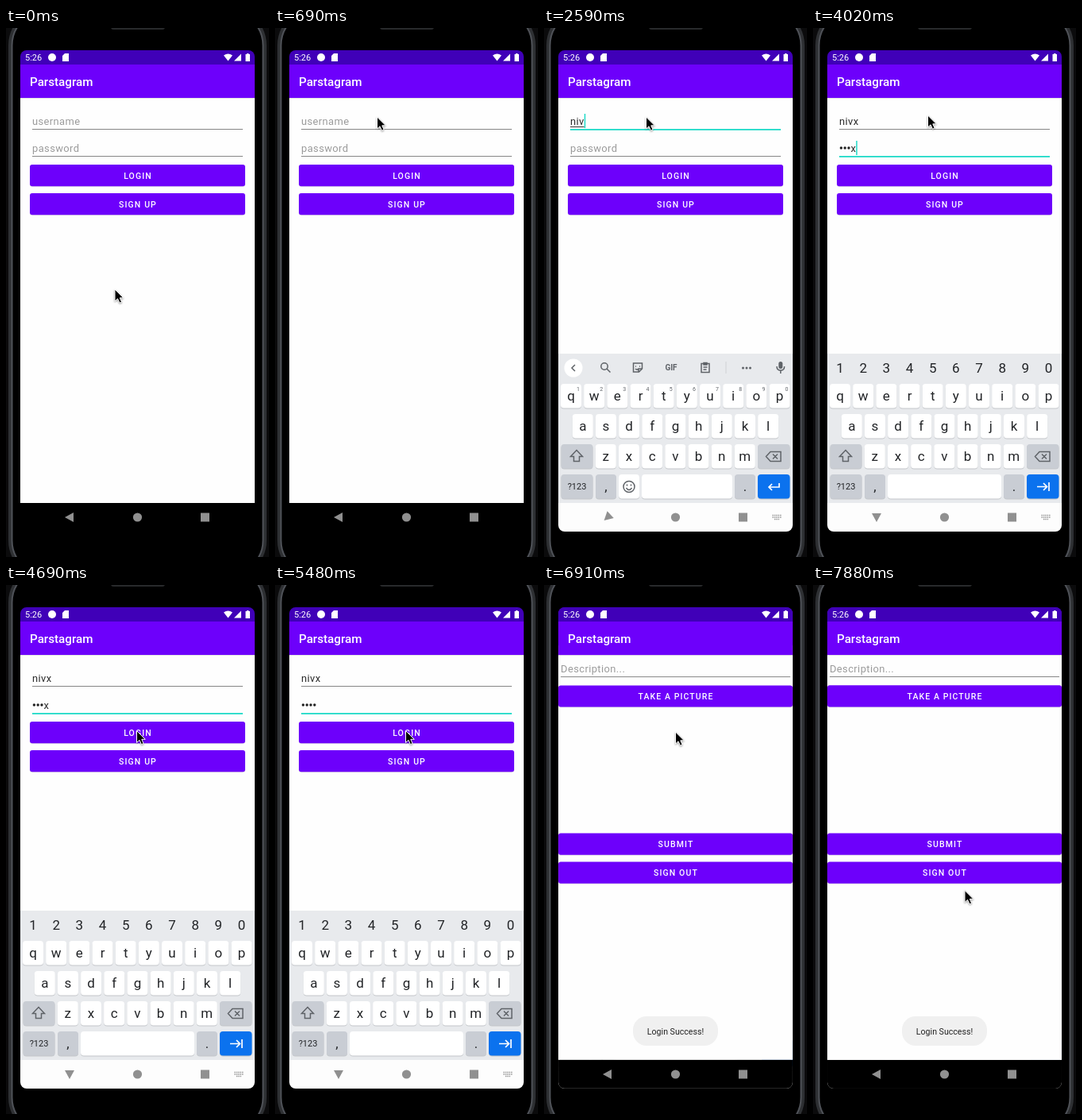
These frames come from a looping animation (331 px wide and 666 px high, 8 s). An HTML page:

```html
<!DOCTYPE html>
<html lang="en">
<head>
<meta charset="utf-8">
<style>
  html, body { margin: 0; width: 100%; height: 100%; overflow: hidden; background: #0b0b0c; }
  svg { display: block; font-family: Roboto, sans-serif; }
  .title { font-size: 15.2px; font-weight: 500; fill: #fff; }
  .field { font-size: 12.92px; letter-spacing: .4px; fill: #2a2a2a; }
  .hint { fill: #9b9b9b; }
  .button { font-size: 10.5px; font-weight: 500; letter-spacing: 1.1px; fill: #fff; text-anchor: middle; }
  .key { font-size: 17px; fill: #222427; text-anchor: middle; }
  .small { font-size: 7px; fill: #5f6368; text-anchor: middle; }
  .icon { fill: none; stroke: #5f6368; stroke-width: 1.5; }
</style>
</head>
<body>
<svg id="stage" width="331" height="666" viewBox="0 0 331 666"></svg>
<script>
const PURPLE = '#6d00fb', DARK = '#4000b8', TEAL = '#1fdac8', GREY = '#c9cdd4';
const USER = 'nivx';
const LOOP = 8000;

const rect = (x, y, w, h, fill, r = 0, extra = '') =>
  `<rect x="${x}" y="${y}" width="${w}" height="${h}" rx="${r}" fill="${fill}" ${extra}/>`;
const text = (x, y, cls, label, extra = '') =>
  `<text x="${x}" y="${y}" class="${cls}" ${extra}>${label}</text>`;
const path = (d, extra = 'class="icon"') => `<path d="${d}" ${extra}/>`;

// App screens
const page = () =>
  rect(18, 88, 295, 510, '#fefefe') + rect(18, 88, 295, 1, '#e4e4e4') +
  rect(18, 28, 295, 18, DARK) + rect(18, 46, 295, 42, PURPLE) +
  text(30, 73.3, 'title', 'Parstagram') + rect(18, 598, 295, 36, '#000');
const button = (x, y, w, label) =>
  rect(x, y + .6, w, 27.3, '#dedbe4', 3) + rect(x, y, w, 27.2, PURPLE, 3) +
  text(166, y + 17.7, 'button', label);
const underline = (x, y, w) => rect(x, y, w, 1, '#868686');
const field = (name, y, hint) =>
  text(33, y, 'field hint', hint, `id="${name}Hint"`) + underline(33, y + 5, 265) +
  rect(33, y + 5, 265, 1.8, TEAL, 0, `id="${name}Focus"`);

// Keyboard
const key = (x, y, w, label = '', fill = '#fff', size = 17) =>
  rect(x, y + 1, w, 30.5, '#c3c6ca', 4) + rect(x, y, w, 30.5, fill, 4) +
  text(x + w / 2, y + 15 + size * .34, 'key', label, `style="font-size:${size}px"`);
const keyRow = (letters, x, y) =>
  [...letters].map((c, i) => key(x + 29.17 * i, y, 26, c)).join('');
const digits = (x, y, cls) =>
  [...'1234567890'].map((c, i) => text(x + 29.17 * i, y, cls, c)).join('');

const toolbar = `
  <circle cx="76" cy="426" r="4.2" class="icon"/>${path('M79 429l4.5 4.5')}
  ${path('M112.5 422h11v7l-4 4h-7zM123 429h-4v4M115 426h1M120 426h1M115 429q2 2 4 0')}
  ${text(160, 431, 'key', 'GIF', 'style="font-size:10px;font-weight:700;fill:#5f6368"')}
  ${path('M198 422.5h10v11h-10zM201 421.5h4v2.5h-4zM200.5 427h5M200.5 430h4')}
  ${rect(228.5, 420, 1, 15, '#cfd2d6')}
  ${[250.5, 255, 259.5].map(x => `<circle cx="${x}" cy="428" r="1.5" fill="#5f6368"/>`).join('')}
  ${path('M39 424l-4 4 4 4')}`;
const suggestions = `
  ${[[88, 'niv'], [162, USER], [236, 'nix']].map(([x, w]) =>
    text(x, 432.5, 'key', w, 'style="font-size:13px"')).join('')}
  ${rect(125, 421, 1, 14, '#cfd2d6')}${rect(199, 421, 1, 14, '#cfd2d6')}
  ${path('M35 424l4 4-4 4')}`;

const whiteLine = 'fill="none" stroke="#fff" stroke-width="1.7"';
const keyboard = `
  ${rect(18, 410, 295, 188, '#e8eaed')}${rect(18, 598, 295, 36, '#fdfdfd')}
  ${keyRow('qwertyuiop', 21, 448)}${keyRow('asdfghjkl', 35.8, 486)}${keyRow('zxcvbnm', 64.8, 524)}
  ${key(21.5, 524, 40, '', GREY)}${key(269, 524, 40.5, '', GREY)}
  ${path('M41 531.5l7.5 8h-4v6h-7v-6h-4z')}
  ${path('M285 533.5h13v12h-13l-5.5-6zM288 536.5l6 6M294 536.5l-6 6')}
  ${key(21.5, 562, 40, '?123', GREY, 11)}${key(65, 562, 26, ',', GREY)}
  ${key(240, 562, 26, '.', GREY)}${key(269, 562, 40.5, '', '#0b72ee')}
  <g id="textMode">
    <circle cx="37" cy="428" r="11.5" fill="#fff"/>
    <g id="toolbar">${toolbar}</g><g id="suggestions">${suggestions}</g>
    ${rect(295.3, 420, 5, 9, '#5f6368', 2.5)}${path('M293 426q0 5 4.8 5t4.8-5M297.8 431v4')}
    ${digits(43, 457, 'small')}
    ${key(94, 562, 26)}${key(123, 562, 114)}
    <circle cx="107" cy="577.5" r="7" class="icon"/>
    ${path('M103.5 579q3.5 5 7 0M104.5 574.5v2M109.5 574.5v2')}
    ${path('M296 573v5h-13M287 574l-4 4 4 4', whiteLine)}
  </g>
  <g id="passMode">
    ${digits(34, 434, 'key')}${key(94, 562, 143)}
    ${path('M282 577.5h12M290 573l4.5 4.5-4.5 4.5M297 572v11', whiteLine)}
  </g>`;

const white = 'fill="#fff"';
const statusIcons = `
  ${text(24, 41, '', '5:26', `font-size="11" ${white}`)}
  <circle cx="58" cy="37" r="5" ${white}/>
  ${path('M74 32h5v10h-8v-7z', white)}
  ${path('M274 34.5q5.5-4 11 0l-5.5 7zM296 32.5v9h-9z', white)}
  ${path('M301.5 33h1.5v-1h2.5v1h1.5v9h-5.5z', white)}`;
const navIcons = `
  <g fill="#909090">
    ${path('M74 616l11-6v12z', 'id="back"')}
    <circle cx="165.5" cy="616" r="5.6"/><rect x="245" y="610.5" width="11" height="11"/>
  </g>
  ${path('M287.5 613.5h11M287.5 616h11M290 618.5h6', 'id="imeIcon" stroke="#8c8c8c" stroke-width="1.3" stroke-dasharray="1.4 1"')}`;

stage.innerHTML = `
  <clipPath id="screen"><rect x="18" y="28" width="295" height="606" rx="8"/></clipPath>
  <clipPath id="loginClip"><rect x="30" y="172" width="271" height="27.2" rx="3"/></clipPath>
  <rect x="6.5" y="-22" width="318" height="711" rx="44" fill="#000" stroke="#2e3033" stroke-width="7"/>
  <rect x="7.5" y="-21" width="316" height="709" rx="43" fill="#000" stroke="#4f5258" stroke-width="2"/>
  ${rect(132, -4, 68, 6, '#28292b', 3)}
  <g clip-path="url(#screen)">
    <g id="loginPage">
      ${page()}${field('user', 122, 'username')}${field('pass', 156, 'password')}
      ${text(33, 122, 'field', '', 'id="userText"')}
      ${rect(33, 124, 0, 1, '#333', 0, 'id="composing"')}
      <g id="dots">${[0, 1, 2, 3].map(i => `<circle cx="${35.4 + 4.8 * i}" cy="151" r="1.7" fill="#222"/>`).join('')}</g>
      ${text(33, 156, 'field', '', 'id="lastChar"')}
      ${rect(0, 0, 1.5, 18, TEAL, 0, 'id="caret"')}
      ${button(30, 172, 271, 'LOGIN')}${button(30, 208, 271, 'SIGN UP')}
      <g clip-path="url(#loginClip)"><circle id="ripple" cx="165" cy="186" ${white}/></g>
      <g id="keyboard">${keyboard}</g>
    </g>
    <g id="homePage">
      ${page()}${text(21, 110, 'field hint', 'Description...')}${underline(21, 115, 289)}
      ${button(18, 126.3, 295, 'TAKE A PICTURE')}${button(18, 312.5, 295, 'SUBMIT')}${button(18, 348.5, 295, 'SIGN OUT')}
    </g>
    <g id="toast">
      ${rect(112, 543, 107, 37, '#f0f0f0', 17)}
      ${text(165.5, 566, '', 'Login Success!', 'font-size="10.6" fill="#222" text-anchor="middle"')}
    </g>
    ${statusIcons}${navIcons}
  </g>
  ${path('M0 -1V14L3.5 10.8 6 16.2 8.6 15 6.3 9.8H10.8Z', 'id="pointer" stroke="#fff" stroke-width="1" style="filter:drop-shadow(0 1px 1px #0006)"')}`;

const el = id => document.getElementById(id);
const fade = (id, v) => el(id).setAttribute('opacity', v);
const show = (node, on) => { node.style.display = on ? '' : 'none'; };
const showId = (id, on) => show(el(id), on);
const ramp = (t, a, b) => Math.min(1, Math.max(0, (t - a) / (b - a)));
const within = (t, spans) => spans.some(([a, b]) => t >= a && t < b);
const typed = (t, times) => times.filter(x => t >= x).length;
const scaleAt = (id, s) =>
  el(id).setAttribute('transform', `translate(165.5 331) scale(${s}) translate(-165.5 -331)`);

// Pointer moves: start, end, cubic control points
const moves = [
  [20, 690, [137, 330], [147, 290], [142, 113], [128.5, 113]],
  [2770, 2850, [128.5, 113], [128.5, 113], [144.5, 111], [144.5, 111]],
  [4020, 4290, [144.5, 111], [144.5, 111], [180, 208], [180, 208]],
  [4440, 4690, [180, 208], [180, 208], [164.5, 184.5], [164.5, 184.5]],
  [5690, 5720, [164.5, 184.5], [164.5, 184.5], [165.5, 186], [165.5, 186]],
  [7300, 7880, [165.5, 186], [112, 220], [250, 435], [191, 385.5]]
];
function pointerAt(t) {
  const [a, b, ...p] = moves.findLast(m => t >= m[0]) || moves[0];
  const u = ramp(t, a, b), v = 1 - u;
  return [0, 1].map(k =>
    v ** 3 * p[0][k] + 3 * v * v * u * p[1][k] + 3 * v * u * u * p[2][k] + u ** 3 * p[3][k]);
}

// Quick start followed by a very long settle
const settle = u => u < 1 / 6 ? .4 * (6 * u) ** 3 : 1 - .6 * Math.exp(-8.2 * (u - 1 / 6));

function drawForm(t) {
  const inPass = t >= 3360;
  fade('userFocus', inPass ? 0 : ramp(t, 1200, 1400));
  fade('passFocus', inPass ? 1 : 0);

  const userCount = typed(t, [2470, 2530, 2580, 2620]);
  const userText = el('userText');
  userText.textContent = USER.slice(0, userCount);
  const width = userCount ? userText.getComputedTextLength() : 0;
  showId('userHint', !userCount);
  el('composing').setAttribute('width', inPass ? 0 : width);

  const passCount = typed(t, [3630, 3730, 3840, 4020]);
  const plain = passCount > 0 && t < 5480;
  const dotCount = passCount - (plain ? 1 : 0);
  [...el('dots').children].forEach((dot, i) => show(dot, i < dotCount));
  const lastChar = el('lastChar');
  lastChar.textContent = plain ? USER[passCount - 1] : '';
  lastChar.setAttribute('x', 33 + 4.8 * dotCount);
  showId('passHint', !passCount);

  const caret = el('caret');
  const passWidth = 4.8 * dotCount + (plain ? lastChar.getComputedTextLength() : 0);
  caret.setAttribute('x', 33 + (inPass ? passWidth : width));
  caret.setAttribute('y', inPass ? 142 : 108);
  show(caret, within(t, [[1460, 1950], [2470, 4520], [5020, 5480], [5990, 6490]]));

  el('ripple').setAttribute('r', 140 * ramp(t, 4920, 5120));
  fade('ripple', .24 * (1 - ramp(t, 5070, 5210)));
}

function drawKeyboard(t) {
  const rise = 1 - ramp(t, 2320, 2540);
  showId('keyboard', t >= 2320);
  el('keyboard').setAttribute('transform', `translate(0 ${224 * rise * rise})`);
  showId('textMode', t < 3390);
  showId('passMode', t >= 3390);
  const swap = ramp(t, 2760, 2850);
  fade('toolbar', 1 - swap);
  fade('suggestions', swap);
  showId('imeIcon', t >= 1870 && t < 6700);
  const turn = ramp(t, 2565, 2620) - ramp(t, 6700, 6850);
  el('back').setAttribute('transform', `rotate(${-90 * turn} 80 616)`);
}

function drawTransition(t) {
  const p = settle(ramp(t, 6590, 6990));
  scaleAt('loginPage', 1 + .05 * p);
  scaleAt('homePage', .85 + .15 * p);
  fade('homePage', ramp(t, 6625, 6708));
  showId('homePage', t >= 6590);
  showId('toast', t >= 6290);
  fade('toast', 1 - (1 - ramp(t, 6290, 6790)) ** 2);
}

function frame() {
  const t = performance.now() % LOOP;
  drawForm(t);
  drawKeyboard(t);
  drawTransition(t);
  el('pointer').setAttribute('transform', `translate(${pointerAt(t)})`);
  requestAnimationFrame(frame);
}
frame();
</script>
</body>
</html>
```
